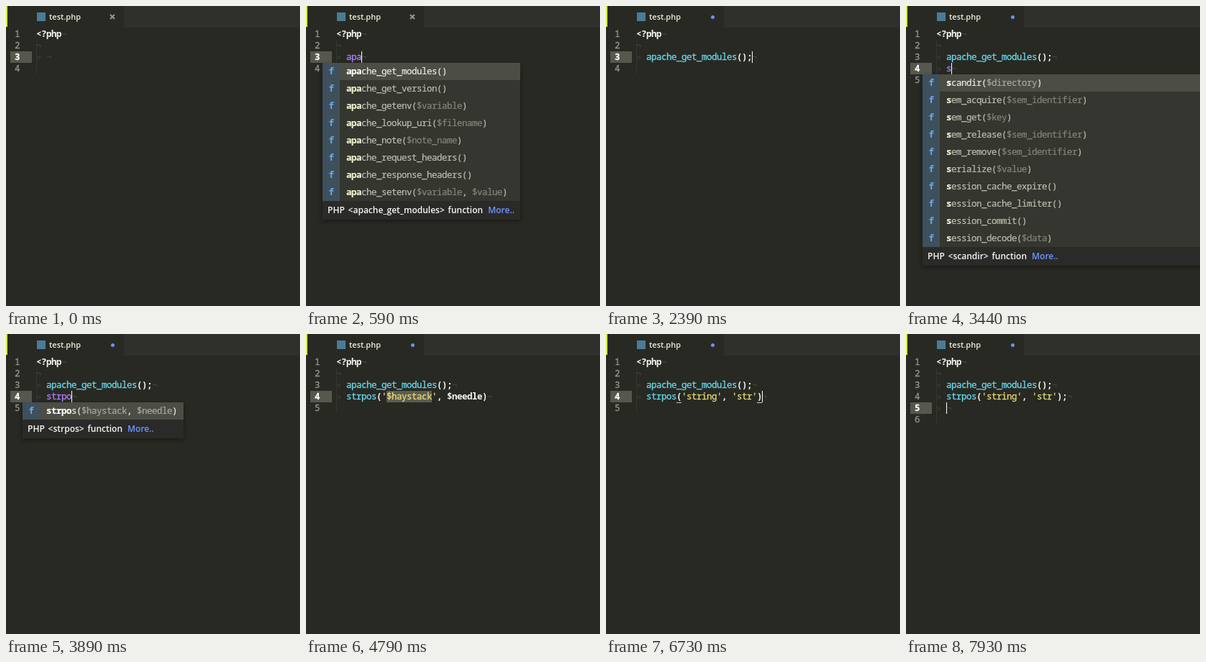
Animation, 409 px wide and 417 px high, one loop 8000 ms. Source, as an HTML page:

```html
<!DOCTYPE html>
<html lang="en">
<head>
<meta charset="utf-8">
<title>PHP completion</title>
<style>
html, body { margin: 0; width: 100%; height: 100%; overflow: hidden; background: #282923; }
body { position: relative; font: 500 12.5px/16px "Noto Sans Mono", "DejaVu Sans Mono", monospace; letter-spacing: -.5px; color: #f8f8f2; white-space: pre; }
#bar, #tab, #tab *, #code, #guide, #popup, .line, .line > *, #foot { position: absolute; }
#bar { left: 164px; right: 0; top: 0; height: 30px; background: #2f302b; }
#tab { left: 0; top: 0; width: 162px; height: 29px; border-left: 2px solid #cfe83c; }
#icon { left: 41px; top: 9px; width: 12px; height: 12px; background: #4a7c98; }
#name { left: 58px; top: 7px; font: 600 11px/16px "Open Sans", "Noto Sans", sans-serif; letter-spacing: 0; color: #eef0d8; }
#close { left: 142px; top: 11px; width: 8px; height: 8px; stroke: #95968f; stroke-width: 2; }
#dot { left: 143.5px; top: 12.5px; width: 5px; height: 5px; border-radius: 50%; background: #6c8ff0; }
#foot { left: 0; right: 0; bottom: 0; height: 5px; background: #2b2724; }
#guide { left: 42px; top: 47px; width: 1px; background: repeating-linear-gradient(#3c3d37 0 1px, #2d2e28 1px 2px); }
.line { left: 0; right: 0; height: 16px; }
.num { left: 6px; width: 24px; padding-left: 6px; color: #95968f; }
.now .num { background: #57584d; color: #fff; font-weight: 600; }
.tab { left: 42px; color: #3e3f39; }
.text { left: 42px; font-weight: 600; }
.text.in { left: 56px; }
.text s { color: #484942; text-decoration: none; font-weight: 400; }
.text i { position: absolute; top: 0; width: 1px; height: 16px; background: #fff; }
.text u, mark { display: inline-block; height: 16px; vertical-align: top; text-decoration: none; }
.text u { box-shadow: 0 1px #c8c8c0; }
mark { background: #5b5c52; color: inherit; }
.num, .fn, .word, .str { -webkit-text-stroke: .3px; font-weight: 500; }
.fn { color: #66d9ef; }
.word { color: #ae81ff; }
.str { color: #e6db74; }
#popup { left: 23px; background: #353630; box-shadow: 0 2px 6px #0006; }
.item { height: 24px; line-height: 24px; padding: 0 9px 0 33px; position: relative; font-weight: 400; color: #bebfb1; -webkit-text-stroke: .2px; }
.item::before { content: "f"; position: absolute; left: 0; width: 24px; text-align: center; background: #3e505b; color: #6ba6f5; font-weight: 700; }
.item:first-child { background: #4c4d45; color: #eeeee4; }
.item b { color: #eef3cf; font-weight: 700; }
.item:first-child b { color: #fff; }
.item span { color: #85867b; }
.item:first-child span { color: #a9aa9e; }
.info { height: 26px; padding: 0 8px 0 7px; background: #2a2a29; font: 600 12px/25px "Open Sans", "Noto Sans", sans-serif; letter-spacing: 0; word-spacing: 1.7px; }
.info em { font-style: normal; color: #7096ff; margin-left: 7px; }
</style>
</head>
<body><div id="bar"></div><div id="tab"><div id="icon"></div><div id="name">test.php</div><svg id="close" viewBox="0 0 8 8"><path d="M1 1L7 7M7 1L1 7"/></svg><div id="dot"></div></div><div id="foot"></div><div id="guide"></div><div id="code"></div><div id="popup"></div>
<script>
const LOOP = 8000, TOP = 31, ROW = 16, SAVED_UNTIL = 1340;
const $ = id => document.getElementById(id);

const apache = ['get_modules()', 'get_version()', 'getenv($variable)', 'lookup_uri($filename)', 'note($note_name)',
  'request_headers()', 'response_headers()', 'setenv($variable, $value)'].map(s => 'apache_' + s);
const lists = {
  a: apache,
  s: ['scandir($directory)', 'sem_acquire($sem_identifier)', 'sem_get($key)', 'sem_release($sem_identifier)',
    'sem_remove($sem_identifier)', 'serialize($value)', 'session_cache_expire()', 'session_cache_limiter()',
    'session_commit()', 'session_decode($data)'],
  st: ['stat($filename)', 'str_getcsv($input)', 'str_ireplace($search, $replace, $subject)', 'str_pad($input, $pad_length)',
    'str_repeat($input, $multiplier)', 'str_replace($search, $replace, $subject)', 'str_rot13($str)',
    'str_shuffle($str)', 'str_split($string)', 'str_word_count($string)'],
  strp: ['strpbrk($haystack, $char_list)', 'strpos($haystack, $needle)', 'strptime($date, $format)'],
  strpo: ['strpos($haystack, $needle)']
};

// Carets: | on, ¦ fading, ~ hidden. [..] is a selection.
const CARETS = { '|': 1, '¦': .5, '~': 0 };
const one = 'apache_get_modules();\n';
const arg1 = s => one + `strpos(${s}, $needle)`;
const arg2 = s => one + `strpos('string', ${s}`;
const steps = [
  [0, ''], [300, 'a|'], [450, 'ap|'], [590, 'apa|', 'a'], [740, 'apac|', 'a'], [890, 'apach|', 'a'],
  [1040, 'apache|', 'a'], [1340, 'apache¦', 'a'], [1490, 'apache~', 'a'],
  [1640, 'apache_get_modules()|'], [2090, 'apache_get_modules()¦'], [2240, 'apache_get_modules()~'],
  [2390, 'apache_get_modules();|'], [2690, one + '|'],
  [3290, one + 's|'], [3440, one + 's|', 's'], [3590, one + 'st|', 'st'], [3740, one + 'strp|', 'strp'],
  [3890, one + 'strpo|', 'strpo'], [4040, one + 'strpos|', 'strpo'],
  [4490, arg1('[$haystack]')], [4790, arg1("'[$haystack]'")], [4930, arg1("'st|'")], [5080, arg1("'str|'")],
  [5230, arg1("'strin|'")], [5380, arg1("'string|'")],
  [5680, arg2('[$needle])')], [6130, arg2("'s|')")], [6280, arg2("'st|')")], [6430, arg2("'str|')")],
  [6730, arg2("'str')|")], [6880, arg2("'str')¦")], [7030, arg2("'str')~")], [7180, arg2("'str');|")],
  [7480, arg2("'str');~")], [7930, arg2("'str');\n|")]
];

const span = (cls, s) => `<span class="${cls}">${s}</span>`;

function paint(s) {
  const paired = /\)[|¦~]/.test(s);
  let html = s.replace(/('[^']*')|(\$\w+)|(\w+)(?=\()|(\w+)/g, (m, str, arg, fn) =>
    arg ? m : span(str ? 'str' : fn ? 'fn' : 'word', m));
  if (paired) html = html.replace(/[()]/g, '<u>$&</u>');
  return html.replace(/\[/g, '<mark>').replace(/\]/g, '</mark>')
    .replace(/[|¦~]/g, c => `<i style="opacity:${CARETS[c]}"></i>`);
}

function popupHtml(list, typed) {
  const items = list.map(s => `<div class="item"><b>${typed}</b>` +
    s.slice(typed.length).replace(/\$\w+/g, m => span('', m)) + '</div>');
  return items.join('') + `<div class="info">PHP &lt;${list[0].split('(')[0]}&gt; function<em>More..</em></div>`;
}

function render([t, src, key]) {
  const body = src.split('\n'), now = body.length + 2;
  const eol = '<s>¬</s>';
  const rows = ['&lt;?php' + eol, eol, ...body.map(s => paint(s) + eol), ''];
  $('code').innerHTML = rows.map((s, i) => {
    const inner = i > 1 && i < now;
    return `<div class="line${i + 1 === now ? ' now' : ''}" style="top:${TOP + i * ROW}px;width:409px">` +
      span('num', i + 1) + (inner ? span('tab', '»') : '') + span(inner ? 'text in' : 'text', s) + '</div>';
  }).join('');
  $('guide').style.height = (rows.length - 1) * ROW + 'px';
  $('close').style.display = t < SAVED_UNTIL ? '' : 'none';
  $('dot').style.display = t < SAVED_UNTIL ? 'none' : '';
  const popup = $('popup');
  popup.style.display = key ? '' : 'none';
  popup.style.top = TOP + now * ROW + 'px';
  popup.style.minWidth = key === 's' ? '400px' : '';
  popup.innerHTML = key ? popupHtml(lists[key], body.at(-1).replace(/\W/g, '')) : '';
}

const start = performance.now();
let shown;
function tick() {
  const t = (performance.now() - start) % LOOP;
  const step = steps.findLast(s => s[0] <= t);
  if (step !== shown) render(shown = step);
  requestAnimationFrame(tick);
}
tick();
</script>
</body>
</html>
```
